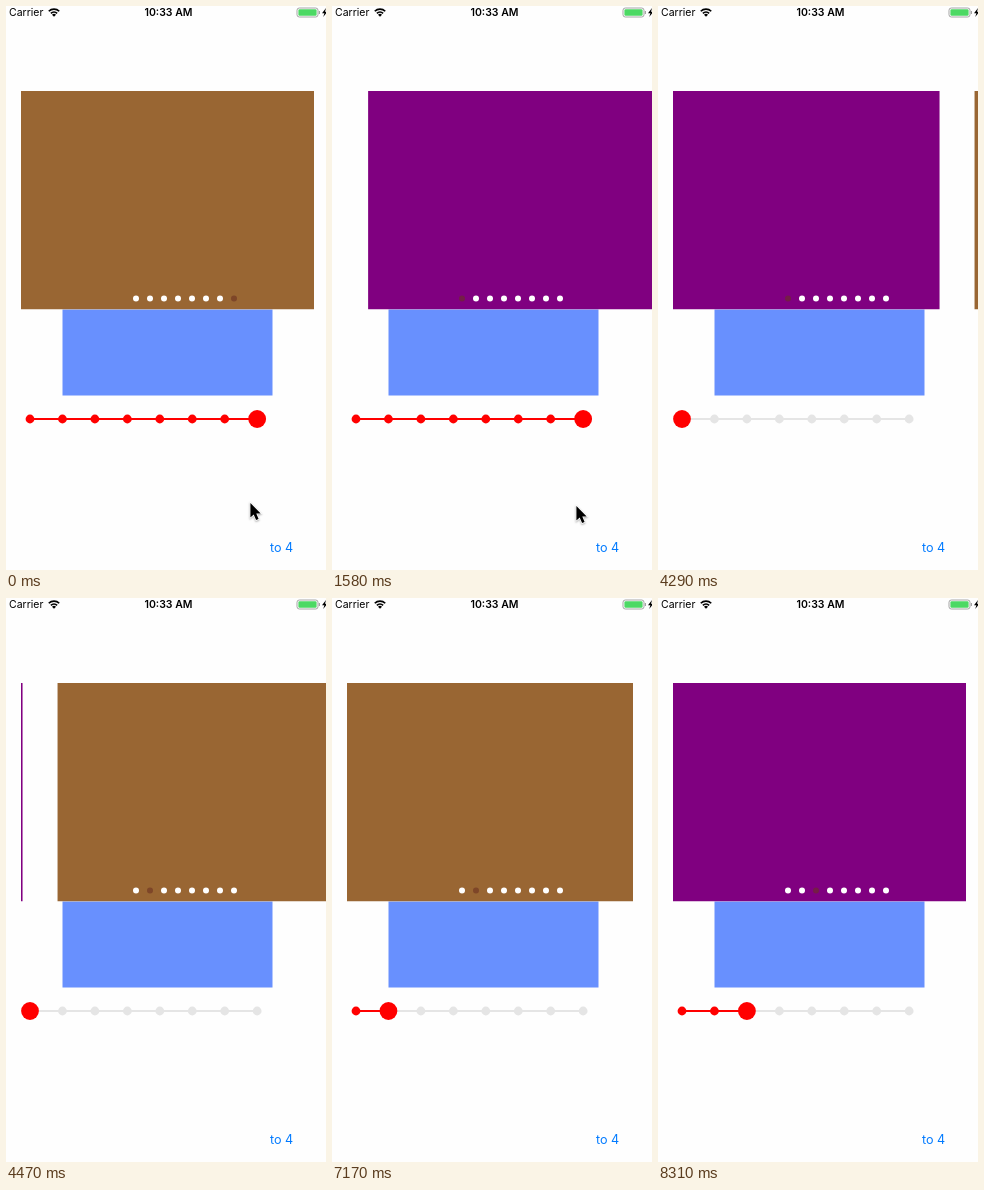
Recreate the animation shown at these times as an HTML page with a canvas. Size 320x564 px, loop 8360 ms.

```html
<!DOCTYPE html>
<html lang="en">
<head>
<meta charset="utf-8">
<title>Carousel with step slider</title>
<style>
  html, body { margin: 0; width: 100%; height: 100%; overflow: hidden; background: #fefefe; }
  canvas { display: block; width: 320px; height: 564px; }
</style>
</head>
<body>
<canvas id="stage"></canvas>
<script>
const LOOP = 8360, W = 320, H = 564;
const SCROLL = 300, SLIDER_DELAY = 360, STRIDE = 328, STEPS = 8;
const moves = [
  { at: 1330, from: 7, to: 0 },
  { at: 4236, from: 0, to: 1 },
  { at: 7143, from: 1, to: 2 }
];
const BG = '#fefefe', RED = '#ff0000', GREY = '#e5e5e5';
const canvas = document.getElementById('stage');
const c = canvas.getContext('2d');
const scale = window.devicePixelRatio || 1;
canvas.width = W * scale;
canvas.height = H * scale;

const clamp = v => Math.max(0, Math.min(1, v));
const ease = v => (1 - Math.cos(Math.PI * clamp(v))) / 2;
const settle = ms => ms <= 0 ? 0 : 1 - (1 + 0.0115 * ms) * Math.exp(-0.0115 * ms);
const stepX = i => 24 + 32.45 * i;

function rect(x, y, w, h, color) {
  c.fillStyle = color;
  c.fillRect(x, y, w, h);
}

function disc(x, y, r, color) {
  c.fillStyle = color;
  c.beginPath();
  c.arc(x, y, r, 0, 2 * Math.PI);
  c.fill();
}

function text(str, x, y, font, color, align = 'left') {
  c.font = font + ' Inter, Roboto, sans-serif';
  c.fillStyle = color;
  c.textAlign = align;
  c.fillText(str, x, y);
}

function polygon(points, x, y) {
  c.beginPath();
  points.forEach(([px, py]) => c.lineTo(x + px, y + py));
  c.closePath();
}

function statusBar() {
  text('Carrier', 3, 10, '10.5px', '#000');
  text('10:33 AM', 162.5, 10, '600 10.5px', '#000', 'center');

  // Wi-Fi fan
  c.strokeStyle = '#000';
  c.lineWidth = 1.7;
  for (const r of [4.4, 7.4]) {
    c.beginPath();
    c.arc(48, 10.5, r, -Math.PI * 0.75, -Math.PI * 0.25);
    c.stroke();
  }
  c.fillStyle = '#000';
  c.beginPath();
  c.moveTo(48, 10.8);
  c.arc(48, 10.8, 2.8, -Math.PI * 0.75, -Math.PI * 0.25);
  c.fill();

  // Battery and charging bolt
  c.strokeStyle = '#a5a5a5';
  c.lineWidth = 1;
  c.beginPath();
  c.roundRect(291, 2, 21, 9, 2.3);
  c.stroke();
  c.fillStyle = '#4cd964';
  c.beginPath();
  c.roundRect(292.4, 3.3, 18.2, 6.4, 1.2);
  c.fill();
  rect(312.8, 5, 1.2, 3, '#a5a5a5');
  c.fillStyle = '#000';
  polygon([[4, 0], [0, 5.2], [2.4, 5.2], [1.2, 9], [5.5, 3.8], [3, 3.8]], 316, 2);
  c.fill();
}

function carousel(move, p) {
  c.save();
  c.beginPath();
  c.rect(15, 85, STRIDE, 218.5);
  c.clip();
  [move.from, move.to].forEach((page, i) =>
    rect(15 + (i - p) * STRIDE, 85, 293, 218.5, page % 2 ? '#996633' : '#800080'));
  c.restore();

  const current = p > 0.5 ? move.to : move.from;
  for (let i = 0; i < STEPS; i++)
    disc(130 + 14 * i, 292.4, 3, i === current ? 'rgba(108,48,33,.6)' : '#fff');
}

function slider(x) {
  const y = 413, start = stepX(0), end = stepX(STEPS - 1);
  rect(start, y - 1, end - start, 2, GREY);
  rect(start, y - 1, x - start, 2, RED);
  for (let i = 0; i < STEPS; i++)
    disc(stepX(i), y, 4.4, stepX(i) <= x ? RED : GREY);
  disc(x, y, 8.9, RED);
}

function pointer(t) {
  if (t > 1900) return;
  const y = 497 + (t >= 60) + (t >= 510) + (t >= 680) + 18 * ease((t - 1600) / 300);
  c.save();
  c.shadowColor = 'rgba(0,0,0,.35)';
  c.shadowBlur = 2 * scale;
  c.shadowOffsetY = scale;
  polygon([[0, 0], [0, 14.5], [3.3, 11.5], [5.7, 17], [8.2, 16], [5.9, 10.6], [10.3, 10.4]], 244.4, y);
  c.lineWidth = 1.4;
  c.strokeStyle = '#fff';
  c.stroke();
  c.restore();
  c.fillStyle = '#000';
  c.fill();
}

function draw(t) {
  c.setTransform(scale, 0, 0, scale, 0, 0);
  rect(0, 0, W, H, BG);
  statusBar();

  const move = moves.findLast(m => t >= m.at) || moves[0];
  const age = t - move.at;
  rect(56.5, 303.5, 210, 86, '#6890fe');
  carousel(move, ease(age / SCROLL));

  const a = stepX(move.from), b = stepX(move.to);
  let x = a + (b - a) * settle(age - SLIDER_DELAY);
  if (Math.abs(x - b) < 0.05) x = b;
  slider(x);

  text('to 4', 264, 546.3, '12.6px', '#007aff');
  pointer(t);
}

const begin = performance.now();
function tick() {
  draw((performance.now() - begin) % LOOP);
  requestAnimationFrame(tick);
}
tick();
</script>
</body>
</html>
```
